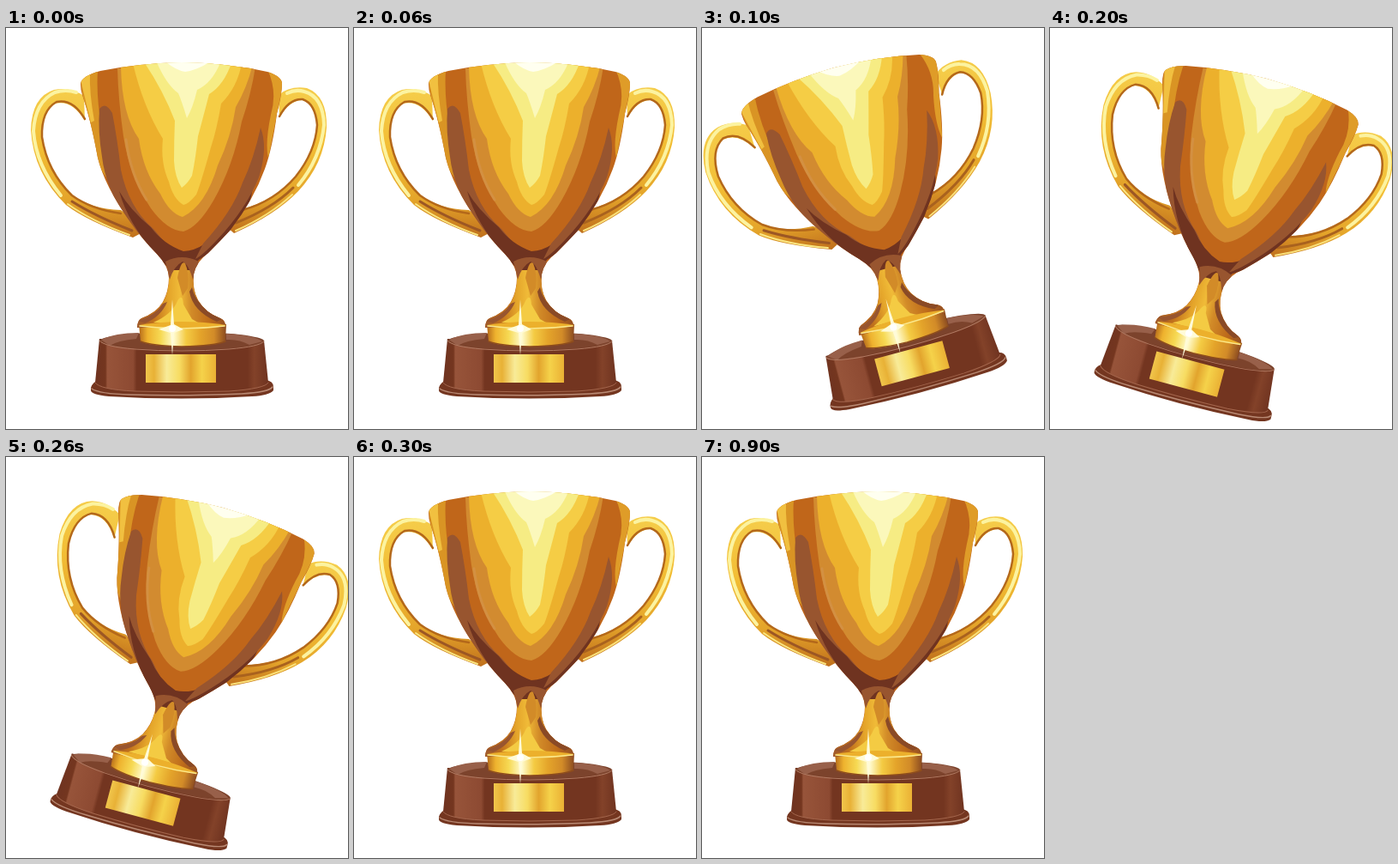
These frames come from a looping animation (399x467 px, 1300 ms). An HTML page:

```html
<!DOCTYPE html>
<html lang="en">
<head>
<meta charset="utf-8">
<title>Shaking trophy</title>
<style>
html, body { margin: 0; width: 100%; height: 100%; overflow: hidden; background: #fff; }
svg { display: block; width: 399px; height: 467px; }
</style>
</head>
<body>
<svg viewBox="0 0 399 467">
  <defs>
    <clipPath id="cup"><path id="bowl" d="M87 65Q88 56 110 50Q155 41 205 40Q260 41 305 51Q321 56 322 64Q322 78 316 100Q311 139 302 164Q289 200 262 235Q250 248 236 262Q222 272 219 287Q217 304 224 317Q233 332 250 338Q257 341 256 349H153Q153 341 158 338Q175 332 183 319Q190 306 190 291Q190 278 176 263Q159 246 145 226Q115 184 107 151Q99 107 89 78Q87 72 87 65Z"/></clipPath>
    <linearGradient id="stem">
      <stop offset="0" stop-color="#98552f"/><stop offset=".2" stop-color="#c0701c"/>
      <stop offset=".36" stop-color="#e4a42a"/><stop offset=".48" stop-color="#f0bb38"/>
      <stop offset=".6" stop-color="#d28b28"/><stop offset=".8" stop-color="#bd6a1a"/>
      <stop offset="1" stop-color="#8a4a26"/>
    </linearGradient>
    <linearGradient id="ring">
      <stop offset="0" stop-color="#b56a1a"/><stop offset=".1" stop-color="#eeb22e"/>
      <stop offset=".25" stop-color="#f6d953"/><stop offset=".4" stop-color="#fffbd0"/>
      <stop offset=".54" stop-color="#f4cb43"/><stop offset=".7" stop-color="#e4a42a"/>
      <stop offset=".86" stop-color="#d28b28"/><stop offset="1" stop-color="#8a4a20"/>
    </linearGradient>
    <linearGradient id="plate">
      <stop offset="0" stop-color="#f1c64c"/><stop offset=".12" stop-color="#e8b136"/>
      <stop offset=".3" stop-color="#f8eb98"/><stop offset=".48" stop-color="#f7dc62"/>
      <stop offset=".64" stop-color="#e2a42d"/><stop offset=".8" stop-color="#f5d24a"/>
      <stop offset="1" stop-color="#eab034"/>
    </linearGradient>
    <linearGradient id="wood">
      <stop offset="0" stop-color="#6f3320"/><stop offset=".06" stop-color="#74361f"/>
      <stop offset=".07" stop-color="#97543a"/><stop offset=".22" stop-color="#8d4a32"/>
      <stop offset=".24" stop-color="#733520"/><stop offset=".88" stop-color="#733520"/>
      <stop offset=".92" stop-color="#834229"/><stop offset="1" stop-color="#6f3320"/>
    </linearGradient>
    <linearGradient id="arm" x1="0" y1="0" x2="0" y2="1">
      <stop offset="0" stop-color="#f5cd4b"/><stop offset=".4" stop-color="#f2bd34"/>
      <stop offset=".75" stop-color="#e4a42a"/><stop offset="1" stop-color="#c0701c"/>
    </linearGradient>
  </defs>

  <g id="trophy" stroke-linecap="round">
    <!-- handles -->
    <g fill="none">
      <path fill="url(#arm)" d="M91 79Q74 68 56 72Q30 80 29 119Q32 169 70 206Q93 224 148 244L165 235L134 212Q99 211 76 194Q47 166 42 128Q41 98 57 88Q77 83 92 108Z"/>
      <path stroke="#fcf3a0" stroke-width="4" d="M82 75Q70 71 57 75Q34 86 32 120Q35 160 64 195"/>
      <path stroke="#b4681a" stroke-width="2.500" d="M92 106Q78 82 59 86Q41 96 42 127Q48 167 77 195Q99 211 134 216"/>
      <path stroke="#9c5724" stroke-width="3" d="M77 202Q104 219 147 236"/>
      <path stroke="#fbe681" stroke-width="2" d="M72 205Q100 225 144 241"/>
      <path fill="url(#arm)" d="M318 78Q331 67 351 70Q375 79 374 116Q371 158 341 190Q315 217 266 239L250 225L275 211Q313 201 338 174Q362 144 363 113Q361 88 346 84Q331 84 319 104Z"/>
      <path stroke="#fcf3a0" stroke-width="4" d="M328 76Q338 71 348 74Q370 80 371 113Q367 152 341 183"/>
      <path stroke="#b4681a" stroke-width="2.500" d="M319 103Q330 82 346 83Q361 88 363 113Q361 144 338 173Q313 202 276 212"/>
      <path stroke="#a9621e" stroke-width="3" d="M335 186Q311 210 268 227"/>
      <path stroke="#fae07a" stroke-width="2" d="M334 194Q307 219 268 236"/>
    </g>

    <!-- wooden base -->
    <path fill="#743620" d="M99 419Q101 412 109 410H303Q312 411 312 418V422Q307 428 287 429Q205 434 120 429Q99 427 99 422Z"/>
    <path fill="none" stroke="#b98a74" stroke-width="1.500" d="M100 420Q108 426 145 427Q205 429 275 426Q307 424 311 418"/>
    <path fill="url(#wood)" d="M109 362L104 413Q109 421 150 423Q205 425 260 423Q303 420 306 413L301 364Z"/>
    <path fill="none" stroke="#a4664d" d="M104 413Q109 421 150 423Q205 425 260 423Q303 420 306 413"/>
    <ellipse cx="205" cy="364.500" rx="96" ry="10.500" fill="#7c432c"/>
    <path fill="#98604a" d="M111 363Q127 355 155 355L152 362Q130 364 121 370Z"/>
    <path fill="#98604a" d="M257 356Q290 358 299 365L284 369Q272 362 257 363Z"/>
    <path fill="none" stroke="#b07a62" d="M109 364Q114 371 150 374Q205 378 260 374Q296 371 301 365"/>
    <path fill="url(#plate)" d="M163 380H245V413H163Z"/>

    <!-- foot -->
    <path fill="url(#ring)" d="M155 345L157 365Q165 370 205 371Q248 370 256 365L257 345Z"/>
    <path fill="none" stroke="#8d4c1c" stroke-width="1.500" d="M157 365Q170 370 205 371Q244 370 256 365"/>

    <!-- bowl and stem -->
    <use href="#bowl" fill="#c0661a"/>
    <g clip-path="url(#cup)">
      <path fill="#d99424" d="M85 48L107 50Q105 80 112 120Q116 159 139 205L100 150Z"/>
      <path fill="#f1c040" d="M87 60L98 52Q97 75 103 108L99 110Z"/>
      <path fill="#98552f" d="M109 94Q116 85 124 99Q130 130 134 165Q143 209 172 234Q190 256 204 267H174L141 224Q116 185 112 150Q107 120 109 94Z"/>
      <path fill="#6f3320" d="M132 190Q144 211 169 232Q184 252 207 260Q233 259 257 226Q276 203 287 174Q292 203 264 234Q244 259 225 270L216 283H192L175 263Q143 229 132 190Z"/>
      <path fill="#98552f" d="M297 116Q306 139 295 174Q280 211 246 247Q229 265 221 269L230 251Q264 214 276 180Q289 153 297 116Z"/>
      <path fill="#df9c28" d="M305 48L325 55L306 152Q302 134 309 101Q317 74 305 48Z"/>
      <path fill="#d28b30" d="M130 47L291 45Q286 77 275 109Q265 161 242 201Q224 232 207 237Q188 236 169 210Q144 172 137 126Q131 84 130 47Z"/>
      <path fill="#ecb02c" d="M134 44L288 42Q281 70 268 92Q263 126 247 160Q233 207 206 220Q191 216 180 193Q160 167 155 129Q135 101 134 44Z"/>
      <path fill="#f5cd45" d="M148 41H275Q270 69 251 88Q246 118 239 139Q227 182 222 194Q213 205 207 206Q195 199 190 179Q180 157 183 129Q160 92 148 41Z"/>
      <path fill="#f6ec84" d="M160 38H264Q255 66 237 77Q230 104 224 126Q221 153 217 172Q212 181 205 186Q197 174 196 155Q196 131 197 108Q183 72 160 38Z"/>
      <path fill="#fbf8bb" d="M175 38H251Q241 64 223 72Q218 93 211 105Q205 85 201 76Q187 66 175 38Z"/>
      <path fill="#fffff0" d="M185 38H240Q224 49 209 51Q197 49 185 38Z"/>
      <path fill="none" stroke="#d39042" stroke-width="3" d="M140 130Q145 170 164 200"/>

      <path fill="url(#stem)" d="M191 282H218L219 297Q221 317 239 331L260 342V350H150V342L174 330Q190 316 190 291Z"/>
      <path fill="#98552f" d="M186 272Q205 262 225 272L218 293Q213 275 206 272Q196 277 191 293Z"/>
      <path fill="#d28b28" d="M200 291Q204 270 209 274Q214 285 212 303L206 312Z"/>
      <path fill="#f4cb43" d="M200 318Q206 308 207 322L217 339L224 343H172Q194 333 200 318Z"/>
      <path fill="#98552f" d="M154 341Q174 335 183 321L188 319Q181 336 162 344Z"/>
      <path fill="#8a4a26" d="M217 302Q222 325 252 339L246 342Q218 330 214 307Z"/>
    </g>
    <path fill="#ecb02c" d="M155 346Q205 338 257 346Q250 350 205 351Q164 350 155 346Z"/>
    <path fill="none" stroke="#fbe88c" stroke-width="1.500" d="M156 347Q205 353 255 347"/>

    <!-- glint -->
    <path fill="#fffbd8" d="M194 316L196 345L207 351L196 355L194 381L192 355L178 351L192 346Z"/>
    <circle cx="194" cy="350" r="4" fill="#fff"/>
  </g>
</svg>
<script>
const trophy = document.getElementById("trophy");
const LOOP = 1300;
const STEP = 100;
const poses = [
  { angle: 0, x: 0, y: 0 },
  { angle: -15, x: -1, y: 1 },
  { angle: 15, x: -2, y: 11 }
];

// Hard steps: upright, left, right, then a long rest upright.
function draw() {
  const step = Math.floor((performance.now() % LOOP) / STEP);
  const { angle, x, y } = poses[step] || poses[0];
  trophy.setAttribute("transform", `translate(${x} ${y}) rotate(${angle} 199.5 233.5)`);
  requestAnimationFrame(draw);
}
draw();
</script>
</body>
</html>
```
